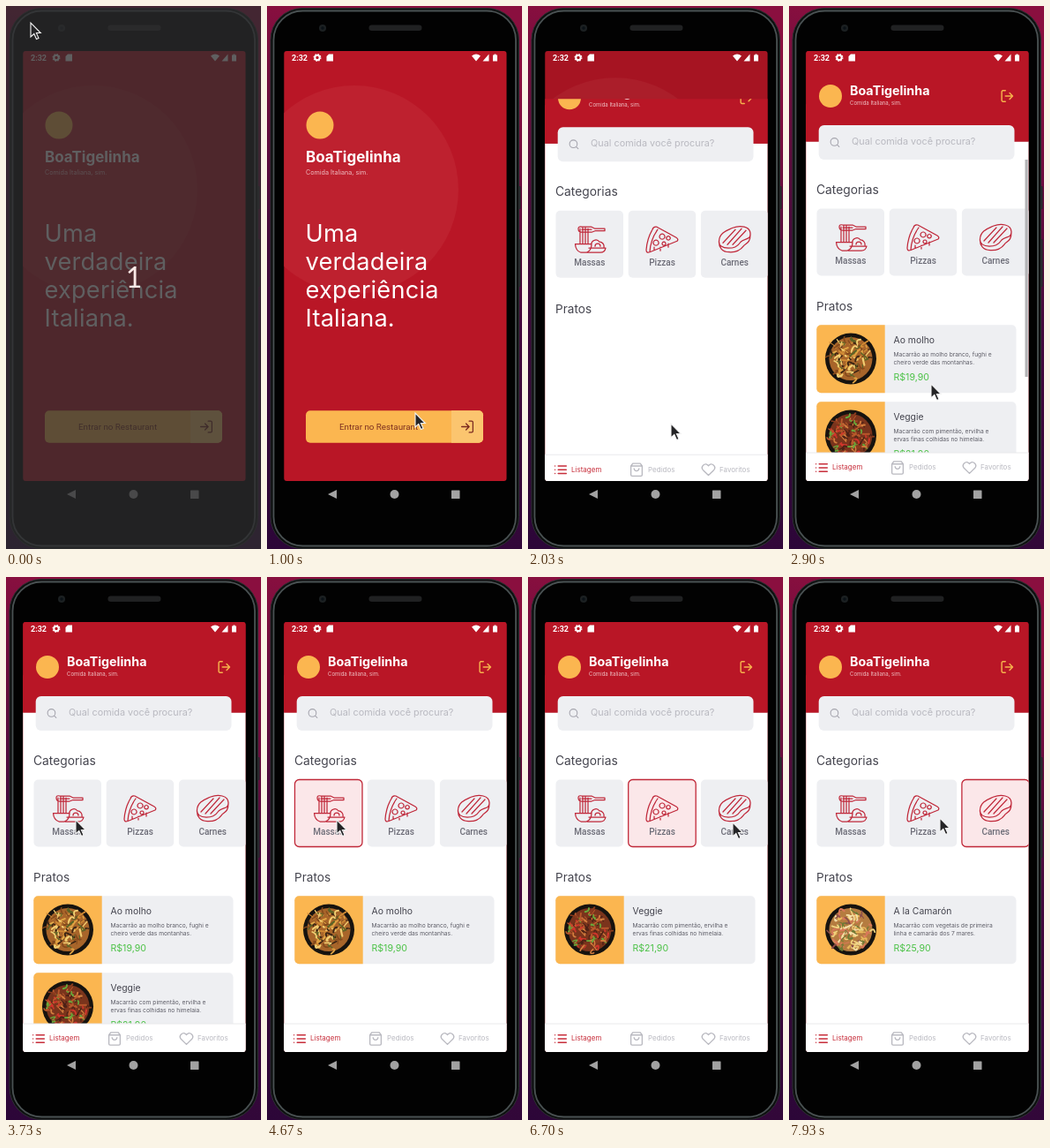
An HTML page for the animation above (8000 ms loop, 289 by 615 pixels).

```html
<!DOCTYPE html>
<html lang="pt">
<head>
<meta charset="utf-8">
<style>
html, body { margin: 0; width: 100%; height: 100%; overflow: hidden; background: #1d0a20; }
svg { display: block; width: 100vw; height: 100vh; }
text { font-family: Inter, Lato, sans-serif; }
.roboto { font-family: Roboto, sans-serif; }
.lato { font-family: Lato, sans-serif; }
.line { fill: none; stroke-linecap: round; stroke-linejoin: round; }
</style>
</head>
<body>
<svg id="stage" viewBox="0 0 289 615" preserveAspectRatio="none"></svg>
<script>
const RED = '#b91626', AMBER = '#fbb650', GREY = '#eeeff2', INK = '#45454f', MUTED = '#b9b9c0';
const SCREEN = { x: 19.3, y: 51, w: 252.2, h: 487 };
const LOOP = 8000;

const rect = (x, y, w, h, fill, rx = 0, extra = '') =>
  `<rect x="${x}" y="${y}" width="${w}" height="${h}" rx="${rx}" fill="${fill}" ${extra}/>`;
const circle = (x, y, r, fill, extra = '') =>
  `<circle cx="${x}" cy="${y}" r="${r}" fill="${fill}" ${extra}/>`;
const label = (x, y, size, fill, str, extra = '') =>
  `<text x="${x}" y="${y}" font-size="${size}" fill="${fill}" ${extra}>${str}</text>`;
const line = (d, color, width = 1) =>
  `<path class="line" d="${d}" stroke="${color}" stroke-width="${width}"/>`;
// Full-width band of the screen; the screen clip trims its sides.
const band = (y, h, fill, extra = '') => rect(18, y, 256, h, fill, 0, extra);
// Icons are drawn on a 24-unit grid centred on cx, cy.
const icon = (d, cx, cy, size, color, width = 2) =>
  `<g transform="translate(${cx - size / 2} ${cy - size / 2}) scale(${size / 24})">${line(d, color, width)}</g>`;

const ICONS = {
  enter: 'M15 3h4a2 2 0 0 1 2 2v14a2 2 0 0 1-2 2h-4M10 17l5-5-5-5M15 12H3',
  leave: 'M9 21H5a2 2 0 0 1-2-2V5a2 2 0 0 1 2-2h4M16 17l5-5-5-5M21 12H9',
  search: 'M19 11a8 8 0 1 1-16 0a8 8 0 0 1 16 0M21 21l-4.3-4.3',
  list: 'M8 6h13M8 12h13M8 18h13M3 6h.01M3 12h.01M3 18h.01',
  bag: 'M6 2L3 6v14a2 2 0 0 0 2 2h14a2 2 0 0 0 2-2V6l-3-4zM3 6h18M16 10a4 4 0 0 1-8 0',
  heart: 'M12 21L3.2 12.3A5.5 5.5 0 0 1 11 4.6L12 5.7L13 4.6A5.5 5.5 0 0 1 20.8 12.3Z'
};

const FOODS = [
  'M53.5 267.5H72Q72 275 66 277H60Q54 275 53.5 267.5ZM59 267V250M62 267V249M65 267V249M68 267V250' +
  'M57 250Q57 247 61 248H72L76 250H87V252.5H76L72 254H61Q57 254 57 250M61 251H72' +
  'M72 269A5 5 0 0 1 81 265A5 5 0 0 1 86 271M69 272H88Q87 277 82 277H67M76 270A3 3 0 0 1 82 270',
  'M146 248Q142 247 141 251Q135 261 134 274Q134 278 138 276.5L169 264Q171 262 168 260ZM147 251Q139 262 138 276' +
  'M152 256a3 3 0 1 0 .1 0M145 263a3 3 0 1 0 .1 0M159 258.5a2.2 2.2 0 1 0 .1 0M154 265a2 2 0 1 0 .1 0M143 274V271M150 271V275M159 267V271',
  'M216.500 264C217 254 226 252 232 249C240 246 252 247 252 256C252 263 245 261 241 265C237 271 233 272 227 272C220 272 216 269 216.500 264Z' +
  'M216.500 264C216 271 220 276.500 228 276.500C236 277 241 274 244 270C247 266 252 267 252 256' +
  'M221 266L235 251M226 268L242 250M232 268L247 252'
];

function randomFrom(seed) {
  return () => (seed = (seed * 16807) % 2147483647) / 2147483647;
}

function bowl(seed, base, tones) {
  const rnd = randomFrom(seed);
  let art = circle(70, 399.5, 29, '#17130f') + circle(70, 399.5, 24.5, base);
  for (let i = 0; i < 90; i++) {
    const a = rnd() * 6.283, r = 23 * Math.sqrt(rnd());
    const x = 70 + r * Math.cos(a), y = 399.5 + r * Math.sin(a);
    const bend = () => (rnd() * 14 - 7 ).toFixed(1);
    art += line(`M${x.toFixed(1)} ${y.toFixed(1)}q${bend()} ${bend()} ${bend()} ${bend()}`,
      tones[Math.floor(rnd() * tones.length)], 1 + rnd() * 1.2);
  }
  return art;
}

const DISHES = [
  { name: 'Ao molho', price: 'R$19,90',
    text: ['Macarrão ao molho branco, fughi e', 'cheiro verde das montanhas.'],
    art: bowl(71, '#a8652a', ['#e5ad4a', '#d08a34', '#84491c', '#f2cf72', '#5b6426', '#3c2514', '#e0a342']) },
  { name: 'Veggie', price: 'R$21,90',
    text: ['Macarrão com pimentão, ervilha e', 'ervas finas colhidas no himelaia.'],
    art: bowl(409, '#7a341c', ['#b9592b', '#8b3b1d', '#d2352c', '#68a83a', '#4c2115', '#d57f3e']) },
  { name: 'A la Camarón', price: 'R$25,90',
    text: ['Macarrão com vegetais de primeira', 'linha e camarão dos 7 mares.'],
    art: bowl(887, '#b57c40', ['#f0d27e', '#e8b85c', '#d9785a', '#8a4a4a', '#6c7a35', '#f4dfa6']) }
];

const dishCard = i => {
  const d = DISHES[i];
  return '<g class="dish">' +
    rect(31.3, 361.3, 226.2, 77, GREY, 5) +
    `<path d="M108.700 361.300H36.300a5 5 0 0 0-5 5v67a5 5 0 0 0 5 5h72.400z" fill="${AMBER}"/>` +
    `<g class="photo">${d.art}</g>` +
    label(118.5, 382, 10.4, INK, d.name) +
    d.text.map((s, n) => label(118.5, 397 + n * 9, 6.7, '#5c5c66', s)).join('') +
    label(118.5, 423.5, 10.6, '#4cc247', d.price) + '</g>';
};

const brand = (x, y, size, subSize, subY) =>
  label(x, y, size, '#fff', 'BoaTigelinha', 'font-weight="700"') +
  label(x, subY, subSize, '#eebfc3', 'Comida Italiana, sim.');

const welcome = band(41, 510, RED) +
  circle(99, 208, 118, '#be212f') +
  circle(60, 135, 15.5, AMBER) +
  brand(44, 177, 17, 7.2, 190.5) +
  ['Uma', 'verdadeira', 'experiência', 'Italiana.']
    .map((s, i) => label(43.5, 267 + i * 32, 27.2, '#fff', s, 'letter-spacing="0.2"')).join('') +
  rect(44, 458.3, 201, 36.5, AMBER, 5) +
  '<path d="M209 458.300h31a5 5 0 0 1 5 5v26.500a5 5 0 0 1-5 5h-31z" fill="#fbc56f"/>' +
  label(82, 480, 9.8, '#7d3020', 'Entrar no Restaurant', 'class="roboto"') +
  icon(ICONS.enter, 227, 476.5, 17, '#7a2a20', 1.8);

const category = (name, i) => {
  const x = 31.5 + i * 82.2;
  return `<rect class="cat" x="${x}" y="229.500" width="76.500" height="76" rx="5" stroke-width="1.300"/>` +
    line(FOODS[i], '#c0283a', 1.25) +
    label(x + 38.3, 292, 10, '#6c6c77', name, 'class="roboto" font-weight="500" text-anchor="middle"');
};

const tab = (shape, name, cx, x, color) =>
  icon(ICONS[shape], cx, 523, 17, color, 1.9) + label(x, 525.3, 8, color, name);

const home = band(153.5, 400, '#fff') +
  band(51, 102.5, RED) +
  circle(47, 102, 13, AMBER) +
  brand(69, 101, 14.3, 6, 112) +
  icon(ICONS.leave, 247.3, 102, 16.5, '#f6b24c', 2.1) +
  rect(33.7, 135, 221.8, 39, GREY, 6) +
  icon(ICONS.search, 52, 154.5, 13, '#a5a5ae', 2) +
  label(71, 157, 10.85, MUTED, 'Qual comida você procura?') +
  label(31, 213, 13.8, INK, 'Categorias') +
  ['Massas', 'Pizzas', 'Carnes'].map(category).join('') +
  label(31, 345.3, 13.6, INK, 'Pratos') +
  [0, 1, 2].map(dishCard).join('') +
  rect(267.5, 174, 3.2, 246, '#b3b3b5', 0, 'id="scrollbar"') +
  band(506, 46, '#fff') + band(505.5, 1, '#e9e9ec') +
  tab('list', 'Listagem', 37, 49, '#c72e3b') +
  tab('bag', 'Pedidos', 123, 136, MUTED) +
  tab('heart', 'Favoritos', 204.5, 217, MUTED);

const statusBar = label(28, 62, 9, '#fff', '2:32', 'class="roboto" font-weight="700"') +
  circle(57, 58.5, 2.7, 'none', 'stroke="#fff" stroke-width="2"') +
  circle(57, 58.5, 3.9, 'none', 'stroke="#fff" stroke-width="1.2" stroke-dasharray="1.5 1.56"') +
  '<path d="M70 54.500h5v8h-7.500v-5.500zM232 56.500q5-4 10 0l-5 6zM251.500 54.500v8h-7z" fill="#fff"/>' +
  '<path d="M256 55.500h1.500v-1h2v1h1.500v7h-5z" fill="#fff"/>';

const phone = rect(284, 204, 3.5, 26, '#25262a', 1) + rect(284, 264, 3.5, 54, '#25262a', 1) +
  rect(4, 2.5, 281.5, 612, '#0d0f0f', 36, 'stroke="#2b2f30"') +
  rect(7.5, 5.5, 274.5, 606, '#020202', 33, 'stroke="#495152" stroke-width="1.8"') +
  circle(63, 25, 4, '#1c2022') + circle(63, 25, 1.8, '#0a1116') +
  rect(115.5, 21.5, 60, 6.5, '#202122', 3.2) +
  '<path d="M69 553l10-5v10z" fill="#a2a2a2"/>' +
  circle(144.5, 553, 5, '#a2a2a2') + rect(209, 548.5, 9.5, 9.5, '#a2a2a2', 0.5);

document.getElementById('stage').innerHTML = `
  <defs>
    <linearGradient id="desk" x1="0" y1="1" x2="0.15" y2="0">
      <stop offset="0" stop-color="#2c0638"/><stop offset="0.55" stop-color="#430a3c"/>
      <stop offset="1" stop-color="#8a0f3f"/>
    </linearGradient>
    <clipPath id="screen">${rect(SCREEN.x, SCREEN.y, SCREEN.w, SCREEN.h, '#000', 3)}</clipPath>
    <clipPath id="window"><rect id="reveal" x="18" width="256" height="500"/></clipPath>
  </defs>
  ${rect(0, 0, 289, 615, 'url(#desk)')}${phone}
  <g clip-path="url(#screen)">
    <g id="welcome">${welcome}</g>
    ${band(51, 487, '#000', 'id="shade"')}
    <g clip-path="url(#window)"><g id="home">${home}</g></g>
    ${statusBar}
  </g>
  <g id="countdown">
    ${rect(0, 0, 289, 615, '#2d2d2f', 0, 'opacity="0.76"')}
    ${label(145, 319, 32, '#fbe9e6', '1', 'class="lato" text-anchor="middle"')}
  </g>
  <path id="cursor" d="M0 0V16L3.800 12.500L6.500 18.500L9 17.400L6.400 11.500H11.300Z"
    fill="#242426" stroke="#f4f4f4" stroke-width="1.100"/>`;

// Pointer stops: time, x, y. Each one holds until the next.
const POINTER = [
  [0, 28, 19], [300, 34, 28], [400, 62, 75], [500, 110, 155], [600, 163, 245], [700, 206, 330],
  [800, 226, 398], [900, 204, 442], [1000, 168, 461], [1100, 169, 476], [1200, 156, 472], [1400, 162, 473],
  [2500, 163, 470], [2600, 163, 462], [2700, 163, 450], [2800, 162, 438], [2900, 161, 428],
  [3000, 150, 392], [3100, 132, 352], [3200, 110, 316], [3300, 92, 294],
  [3400, 84, 282], [3530, 80, 277], [3730, 79, 275],
  [4870, 92, 276], [4970, 122, 276], [5070, 147, 275], [5170, 159, 275],
  [6200, 166, 276], [6300, 186, 278], [6400, 209, 279], [6500, 220, 279], [6600, 228, 278], [6700, 232, 278],
  [7500, 237, 279], [7830, 206, 277], [7930, 171, 273]
];
const PICKS = [[0, -1], [4230, 0], [5730, 1], [7130, 2]];
// Which dishes are listed, top to bottom.
const MENUS = [[0, []], [2200, [0, 1]], [4430, [0]], [5970, [1]], [7270, [2]]];

const lastAt = (steps, t) => steps.reduce((found, s) => (s[0] <= t ? s : found));
const clamp = v => Math.min(1, Math.max(0, v));

function bezierEase(x, x1, y1, x2, y2) {
  const at = (s, a, b) => 3 * s * (1 - s) ** 2 * a + 3 * s * s * (1 - s) * b + s ** 3;
  let lo = 0, hi = 1;
  for (let i = 0; i < 24; i++) {
    const mid = (lo + hi) / 2;
    if (at(mid, x1, x2) < x) lo = mid; else hi = mid;
  }
  return at(hi, y1, y2);
}

const el = id => document.getElementById(id);
const set = (node, name, value) => node.setAttribute(name, value);
const cats = document.querySelectorAll('.cat');
const dishes = document.querySelectorAll('.dish');

function draw(t) {
  set(el('countdown'), 'visibility', t < 30 ? 'visible' : 'hidden');

  const [, px, py] = lastAt(POINTER, t);
  set(el('cursor'), 'transform', `translate(${px} ${py})`);

  const p = bezierEase(clamp((t - 1820) / 540), 0.20833, 0.82, 0.25, 1);
  const gap = SCREEN.h * (1 - p);
  set(el('reveal'), 'y', SCREEN.y + gap);
  set(el('home'), 'transform', `translate(0 ${gap * 0.041})`);
  set(el('welcome'), 'transform', `translate(0 ${-SCREEN.h * 0.02 * p})`);
  set(el('shade'), 'opacity', 0.1 * clamp(p / 0.36));

  const pick = lastAt(PICKS, t)[1];
  cats.forEach((cat, i) => {
    set(cat, 'fill', i === pick ? '#fbe7e9' : GREY);
    set(cat, 'stroke', i === pick ? '#c02838' : 'none');
  });

  const [since, menu] = lastAt(MENUS, t);
  dishes.forEach((dish, i) => {
    const row = menu.indexOf(i);
    set(dish, 'visibility', row < 0 ? 'hidden' : 'visible');
    set(dish, 'transform', `translate(0 ${Math.max(row, 0) * 87})`);
    set(dish.querySelector('.photo'), 'opacity', since > 5000 ? clamp((t - since) / 300) : 1);
  });
  set(el('scrollbar'), 'opacity', t < 2200 ? 0 : 1 - clamp((t - 3340) / 390));
}

const start = performance.now();
function tick() {
  draw((performance.now() - start) % LOOP);
  requestAnimationFrame(tick);
}
tick();
</script>
</body>
</html>
```
